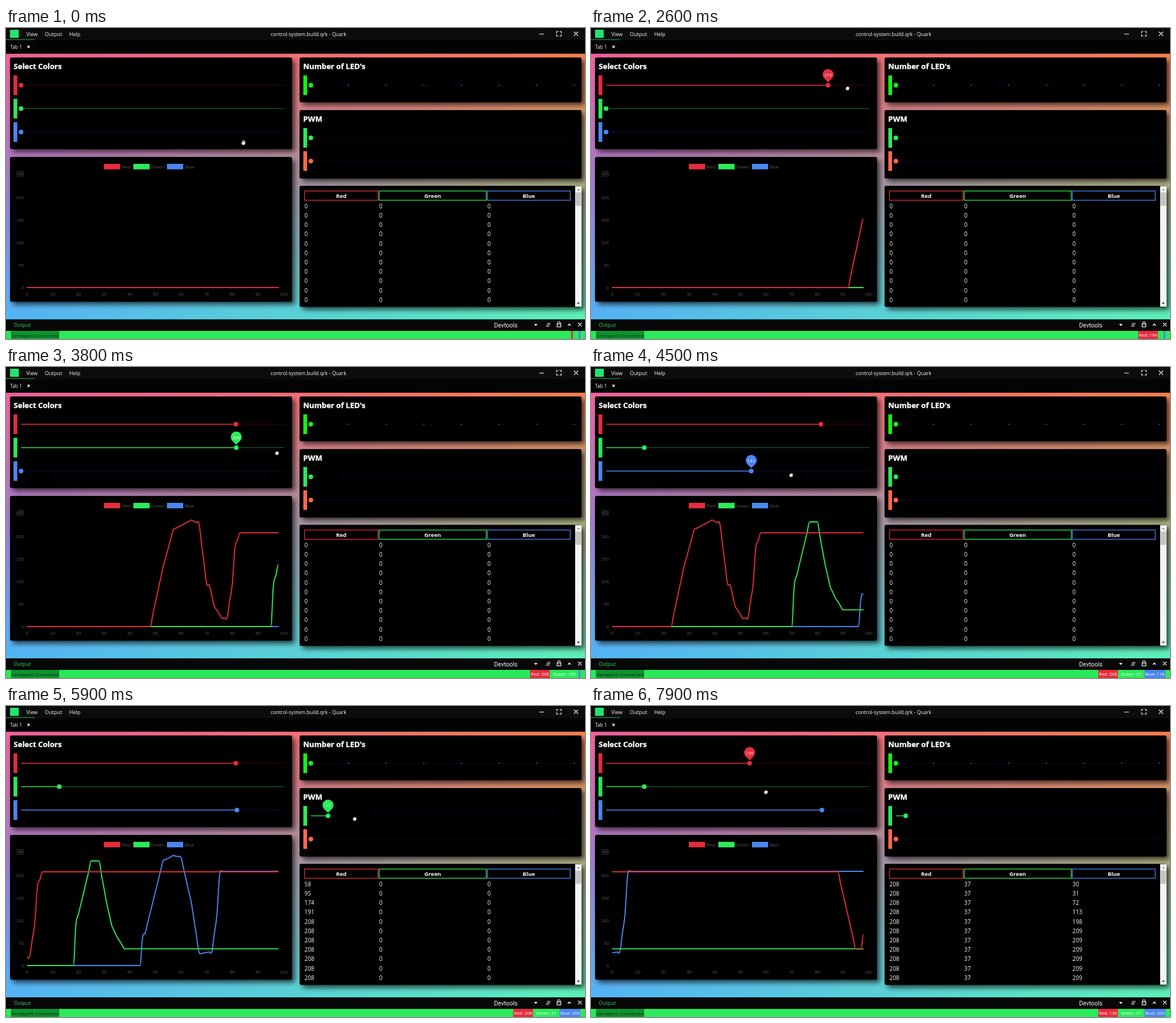
An HTML page that plays this animation: 1000x538 px, repeating every 8000 ms.

```html
<!DOCTYPE html>
<html lang="en">
<head>
<meta charset="utf-8">
<title>Control panel</title>
<style>
  html, body { margin: 0; width: 100%; height: 100%; overflow: hidden; background: #000; }
  svg { position: absolute; left: 0; top: 0; }
  text { font-family: "Open Sans", "Noto Sans", sans-serif; fill: #fafafa; }
  .title { font-weight: 700; stroke: #fafafa; stroke-width: .4; }
  .axis { font-family: "Liberation Sans", Arial, sans-serif; fill: #525252; }
  #status { position: absolute; right: 8px; top: 524px; height: 14px; display: flex; gap: 4px;
    font: 7.8px/15px "Open Sans", "Noto Sans", sans-serif; color: #fafafa; white-space: pre; }
  #status span { padding: 0 1.3px; }
</style>
</head>
<body>
<svg id="stage" width="1000" height="538" viewBox="0 0 1000 538">
  <defs>
    <linearGradient id="cool" x2="0" y2="1">
      <stop offset=".08" stop-color="#f2609c"/>
      <stop offset=".5" stop-color="#a07ccc"/>
      <stop offset=".93" stop-color="#52b4f6"/>
    </linearGradient>
    <linearGradient id="warm" x2="0" y2="1">
      <stop offset=".08" stop-color="#f88050"/>
      <stop offset=".5" stop-color="#acb080"/>
      <stop offset=".93" stop-color="#5cf0b8"/>
    </linearGradient>
    <linearGradient id="across">
      <stop offset="0" stop-color="#000"/>
      <stop offset="1" stop-color="#fff"/>
    </linearGradient>
    <mask id="blend"><rect width="1000" height="538" fill="url(#across)"/></mask>
    <filter id="shadow" x="-10%" y="-10%" width="120%" height="130%">
      <feDropShadow dx="5" dy="5" stdDeviation="4" flood-color="#000" flood-opacity=".65"/>
    </filter>
  </defs>
</svg>
<div id="status"></div>
<script>
const LOOP = 8000, STEP = 100;
const RED = '#e62c3c', GREEN = '#2bea5a', BLUE = '#4c86f0', ORANGE = '#ff6a48', PALE = '#fafafa';
const stage = document.getElementById('stage');

function add(tag, attrs, parent = stage) {
  const el = document.createElementNS('http://www.w3.org/2000/svg', tag);
  for (const key in attrs) el.setAttribute(key, attrs[key]);
  parent.append(el);
  return el;
}
const rect = (x, y, width, height, fill, more) => add('rect', { x, y, width, height, fill, ...more });
const line = (d, stroke, width = 1) => add('path', { d, stroke, fill: 'none', 'stroke-width': width });
function label(x, y, str, size, more, parent) {
  const el = add('text', { x, y, 'font-size': size, ...more }, parent);
  el.textContent = str;
  return el;
}

// Piecewise linear value through [position, value] keys, held beyond both ends
function track(keys, at) {
  let i = 1;
  while (i < keys.length - 1 && keys[i][0] < at) i++;
  const [p0, a] = keys[i - 1], [p1, b] = keys[i];
  return a + (b - a) * Math.min(1, Math.max(0, (at - p0) / (p1 - p0)));
}

// Turning points of each signal, by sample index
const channels = [
  { name: 'Red', color: RED, rail: '#40060e', keys: [
    [92, 0], [97, 132], [101, 215], [108, 236], [111, 228], [114, 95], [115, 92], [117, 45], [120, 18],
    [122, 20], [124, 95], [125, 174], [127, 208], [278, 208], [285, 36], [287, 36], [290, 136], [292, 142]] },
  { name: 'Green', color: GREEN, rail: '#0a6e2a', keys: [
    [139, 0], [140, 90], [146, 232], [149, 232], [152, 139], [154, 89], [156, 64], [159, 37]] },
  { name: 'Blue', color: BLUE, rail: '#0a0a38', keys: [
    [165, 0], [166, 62], [167, 72], [174, 232], [178, 244], [181, 240], [183, 190], [185, 140], [188, 30],
    [189, 27], [193, 31], [195, 113], [196, 198], [197, 209]] }
];
const sample = (ch, index) => track(ch.keys, index);
const scrollKeys = [[0, -95], [3800, 44], [5200, 94], [6700, 152], [7900, 190]];
const pwmKeys = [[5850, 0], [6300, 150], [6600, 225], [6800, 232], [7200, 9.5]];
const scroll = t => Math.round(track(scrollKeys, t));

// Window frame
rect(0, 0, 1000, 538, 'url(#cool)');
rect(0, 0, 1000, 538, 'url(#warm)', { mask: 'url(#blend)' });
rect(0, 0, 1000, 21, '#0c0c0c');
rect(0, 21, 1000, 23.5, '#030303');
rect(7, 3, 15, 14, '#22e470', { rx: 1 });
rect(0, 19.5, 50, 1.2, '#159a4c');
label(35, 13.5, 'View', 9);
label(67, 13.5, 'Output', 9);
label(109, 13.5, 'Help', 9);
label(522.5, 13.5, 'control-system.build.qrk - Quark', 8.7, { 'text-anchor': 'middle' });
label(7, 35.5, 'Tab 1', 8.4);
line('M37 30.5l4 4m0-4l-4 4', PALE, 1.2);
line('M921 10.5h8M951 9v-3h3m2 0h3v3m0 2v3h-3m-2 0h-3v-3M981 6.5l7 7m0-7l-7 7', PALE, 1.2);

// Panels
function panel(x, y, height, title) {
  rect(x, y, 487, height, '#000', { rx: 3, filter: 'url(#shadow)' });
  if (title) label(x + 6.3, y + 20.3, title, 13, { class: 'title' });
}
panel(7, 51, 158.5, 'Select Colors');
panel(7, 223, 250.5);
panel(507, 51, 77.5, "Number of LED's");
panel(507, 142, 118.5, 'PWM');
panel(507, 273, 209.5);

// Sliders
function slider(x, y, color, rail, read = () => 0) {
  rect(x - 13, y - 17, 6.5, 34, color);
  line(`M${x} ${y}h455`, rail);
  const fill = line('', color, 1.3);
  const knob = add('circle', { r: 4, cy: y, fill: color });
  const pin = add('g', {});
  add('path', { d: 'M0 -5C-3 -9 -9.5 -12 -9.5 -18.5a9.5 9.5 0 0 1 19 0C9.5 -12 3 -9 0 -5z', fill: color }, pin);
  const text = label(0, -15, '', 7.5, { 'text-anchor': 'middle' }, pin);
  const place = value => x + value * 1.784;
  return {
    y,
    pointerX: t => place(read(t + 30)) + 28,
    update(t, dragged) {
      const value = read(t), cx = place(value);
      fill.setAttribute('d', `M${x} ${y}H${cx}`);
      knob.setAttribute('cx', cx);
      pin.setAttribute('transform', `translate(${cx} ${y})`);
      pin.setAttribute('visibility', dragged ? 'visible' : 'hidden');
      text.textContent = Math.round(value);
    }
  };
}
const sliders = channels.map((ch, i) =>
  slider(26, 99 + i * 40.5, ch.color, ch.rail, t => sample(ch, scroll(t) + 101)));
sliders.push(
  slider(526.5, 190, GREEN, '#08081e', t => track(pwmKeys, t)),
  slider(526.5, 230.2, ORANGE, '#08081e'),
  slider(526.5, 99, '#14f414', '#08081e'));
for (let i = 1; i < 8; i++) rect(525.8 + i * 65, 98.4, 1.6, 1.4, '#3fae8a');

// Chart
const COUNT = 98;
const chartX = i => 36.5 + i * 4.43, chartY = v => 449 - v * 0.78;
channels.forEach((ch, i) => {
  const x = 169 + i * 51 + (i > 1 ? 7 : 0);
  rect(x, 235, 28, 9.5, ch.color);
  label(x + 31, 242.8, ch.name, 8, { class: 'axis' });
});
const tickY = v => label(31, chartY(v) + 2.9, v, 8, { class: 'axis', 'text-anchor': 'end' });
for (let v = 0; v <= 250; v += 50) tickY(v);
tickY(255);
for (let v = 0; v <= 100; v += 10) label(chartX(v), 463, v, 8, { class: 'axis', 'text-anchor': 'middle' });
const curves = [...channels].reverse().map(ch => ({ ch, path: line('', ch.color, 1.9) }));

function curve(ch, from) {
  const y = i => chartY(sample(ch, from + Math.min(COUNT, Math.max(0, i))));
  // Flat tangents at peaks keep the curve from overshooting
  const slope = i => (y(i + 1) - y(i)) * (y(i) - y(i - 1)) > 0 ? (y(i + 1) - y(i - 1)) * 0.2 : 0;
  let d = `M${chartX(0)} ${y(0)}`;
  for (let i = 0; i < COUNT; i++)
    d += `C${chartX(i + .4)} ${y(i) + slope(i)} ${chartX(i + .6)} ${y(i + 1) - slope(i + 1)} ${chartX(i + 1)} ${y(i + 1)}`;
  return d;
}

// Table
const columns = [[515.5, 127], [644.5, 185], [831.5, 143]];
const cells = columns.map(([x, w], c) => {
  rect(x, 282, w, 16, 'none', { stroke: channels[c].color, 'stroke-width': 1.3 });
  label(x + w / 2, 293.6, channels[c].name, 9.6, { 'text-anchor': 'middle', 'font-weight': 700 });
  return Array.from({ length: 11 }, (_, r) => label(x, 311.8 + r * 16.2, '', 9.9));
});
rect(983, 273.5, 11, 208.5, '#f4f4f4');
rect(983.5, 284.5, 10, 23, '#c4c4c4');
add('path', { d: 'M986 281h5l-2.5 -3z', fill: '#8a8a8a' });
add('path', { d: 'M986 475h5l-2.5 3z', fill: '#333' });

// Output bar and status line
rect(0, 504, 1000, 20, '#080808');
label(13.5, 516.5, 'Output', 8.8, { style: 'fill:#30d868' });
label(843, 517.5, 'Devtools', 10.4, { style: 'font-family:Roboto,sans-serif' });
add('path', { d: 'M912 512h6l-3 3.5z', fill: PALE });
line('M934.5 511h6M933.5 513.5h6M932.5 516h6M953 512v-2a2 2 0 0 1 4 0v2M970.5 515l2.5-3 2.5 3M988 510l6 6m0-6l-6 6', PALE, 1.2);
rect(951.8, 512, 6.5, 5, 'none', { stroke: PALE, 'stroke-width': 1.2 });
rect(0, 524, 1000, 14, GREEN);
rect(8.5, 524, 83.5, 14, '#0e9430');
label(10, 534.5, 'Serialport: Connected', 8, { style: 'fill:#032a0c' });
const tags = channels.map(ch => {
  const tag = document.createElement('span');
  tag.style.background = ch.color;
  document.getElementById('status').append(tag);
  return tag;
});

// Pointer: drags one slider after another, sinking by `drop` below the knob
const drags = [
  { start: 2330, end: 3290, on: sliders[0], drop: 6 },
  { start: 3610, end: 4170, on: sliders[1], drop: 18 },
  { start: 4330, end: 5350, on: sliders[2], drop: 17 },
  { start: 5850, end: 7200, on: sliders[3], drop: 10 },
  { start: 7450, end: 8000, on: sliders[0], drop: 60 }
];
const stops = [[0, 410, 198], [1300, 401, 185], ...drags.flatMap(({ start, end, on, drop }) => [
  [start, on.pointerX(start), on.y + 5], [end, on.pointerX(end), on.y + drop]])];
const pathX = stops.map(([t, x]) => [t, x]), pathY = stops.map(([t, , y]) => [t, y]);
const pointer = add('path', { fill: PALE, stroke: '#222', 'stroke-width': .5 });
const OPEN = 'M-1.8 4.3L-4 .5l.8-.7 1.3 1-.7-4 1-.3.7 2.5.1-3.4h1.1l.3 3.3.8-2.9 1 .3-.3 3 .8-1.5.9.4-.8 4-1 2.1z';
const FIST = 'M-1.8 3.2L-3.3.6l.7-1 .5-1.6 1.2-.5.9-.4 1.2.2 1.2.3.8 1-.2 2.5-.8 2.1z';

function render(t) {
  const from = scroll(t);
  const drag = drags.find(d => t >= d.start && t < d.end);
  sliders.forEach(s => s.update(t, drag?.on === s));
  curves.forEach(({ ch, path }) => path.setAttribute('d', curve(ch, from)));
  channels.forEach((ch, c) => {
    cells[c].forEach((cell, r) => { cell.textContent = Math.round(sample(ch, from + 2 + r)); });
    const value = Math.round(sample(ch, from + 100));
    tags[c].textContent = value ? `${ch.name}: ${value}` : '';
  });
  const x = drag ? drag.on.pointerX(t) : track(pathX, t);
  pointer.setAttribute('d', drag ? FIST : OPEN);
  pointer.setAttribute('transform', `translate(${x} ${track(pathY, t)})`);
}

const begin = performance.now();
function tick() {
  const t = (performance.now() - begin) % LOOP;
  render(Math.floor(t / STEP) * STEP);
  requestAnimationFrame(tick);
}
tick();
</script>
</body>
</html>
```
